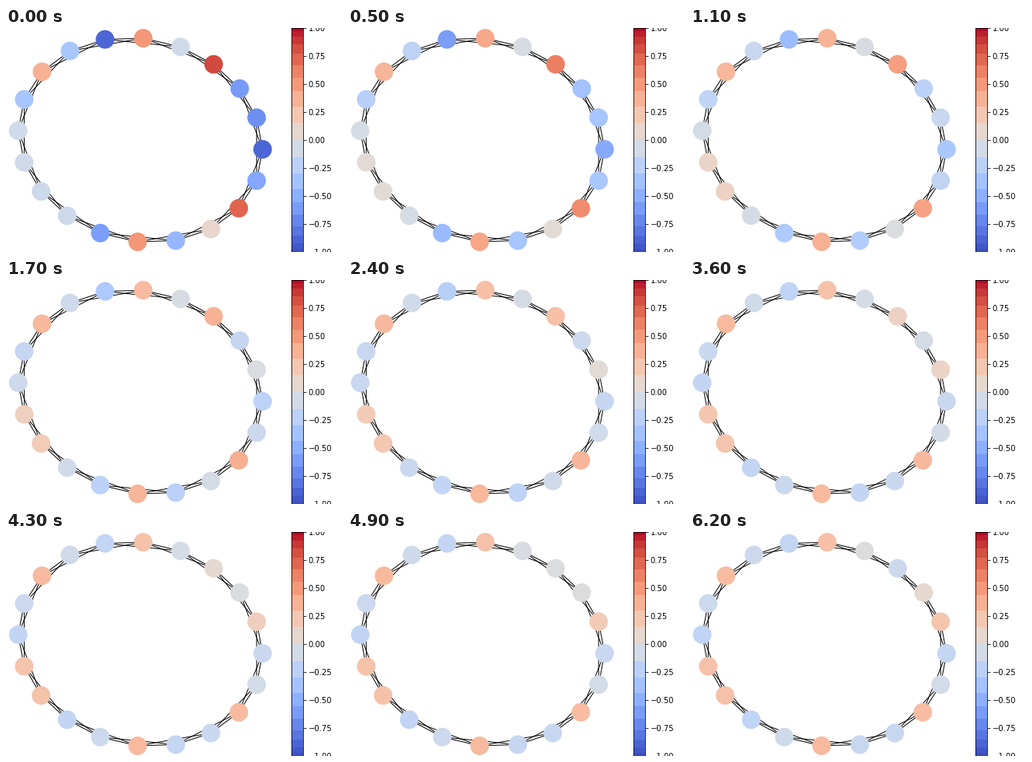
Recreate the animation shown at these times as a matplotlib script. Size 432 px wide and 288 px high, loop 6.3 s.

```python
import numpy as np
import matplotlib.pyplot as plt
from matplotlib.animation import FuncAnimation
from matplotlib.collections import LineCollection

W, H, DPI = 432, 288, 72
FRAMES, INTERVAL = 63, 100
N = 20
CMAP = plt.get_cmap("coolwarm")

# Opinion dynamics: decay, own support, rivalry with neighbours, slight bias
STEP, GAIN, SELF, RIVAL, BIAS = 0.1, 0.27, 2.5, 1.75, 0.055
START = np.array([-.88, -.68, -.62, .83, -.09, .51, -.88, -.34, .37, -.35,
                  -.10, -.10, -.12, -.12, -.60, .51, -.45, .09, .73, -.55])


def ring():
    """Slightly tilted and wavy ellipse, counter-clockwise from the right."""
    a = 2 * np.pi * np.arange(N) / N
    x = 172.8 + 157.1 * np.cos(a) + 2.6 * np.sin(a) - np.sin(3 * a)
    y = 144 + 13 * np.cos(a) - 130.9 * np.sin(a) - np.cos(3 * a)
    return np.column_stack([x, y])


def simulate():
    states = [START]
    for _ in range(FRAMES - 1):
        v = states[-1]
        near = sum(np.roll(v, d) for d in (-2, -1, 1, 2))
        pull = GAIN * np.tanh(SELF * v - RIVAL * near) + BIAS
        states.append(v + STEP * (pull - v))
    return states


def colors(v):
    return CMAP((np.asarray(v) + 1) / 2)


nodes = ring()
states = simulate()

fig = plt.figure(figsize=(W / DPI, H / DPI), dpi=DPI, facecolor="white")

ax = fig.add_axes([0, 0, 0.8, 1])
ax.set_xlim(0, 0.8 * W)
ax.set_ylim(H, 0)
ax.axis("off")

links = [(nodes[i], nodes[(i + d) % N]) for i in range(N) for d in (1, 2)]
ax.add_collection(LineCollection(links, colors="black", linewidths=1, zorder=1))
dots = ax.scatter(*nodes.T, s=500, c=colors(START), linewidths=1.5,
                  edgecolors="face", zorder=2, clip_on=False)

# Colour scale whose bands narrow towards both ends
half = 1 - (1 - np.linspace(0, 1, 11)) ** 1.6
edges = np.concatenate([-half[:0:-1], half])
mids = (edges[:-1] + edges[1:]) / 2

cax = fig.add_axes([0.85, 0, 14.4 / W, 1])
cax.pcolormesh([0, 1], edges, mids[:, None], cmap=CMAP, vmin=-1, vmax=1)
cax.set_xticks([])
cax.set_ylim(-1, 1)
cax.yaxis.tick_right()
cax.set_yticks(np.linspace(-1, 1, 9))


def update(i):
    shades = colors(states[i])
    dots.set_facecolor(shades)
    dots.set_edgecolor(shades)
    return dots,


anim = FuncAnimation(fig, update, frames=FRAMES, interval=INTERVAL,
                     repeat=True, repeat_delay=0)
plt.show()
```
